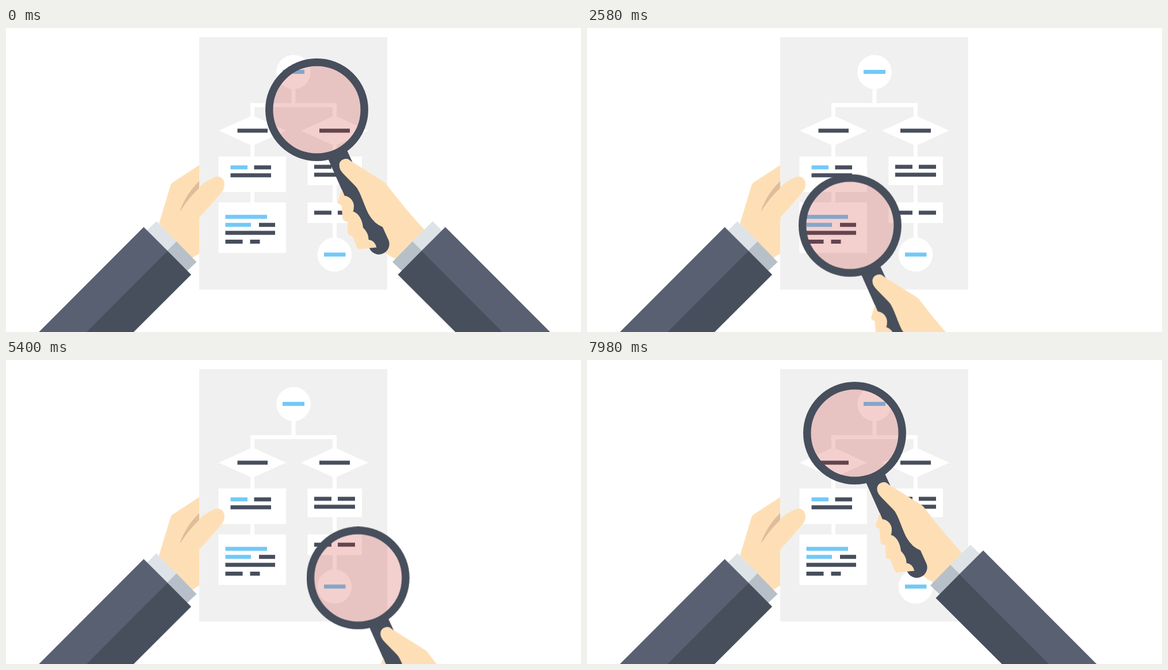
These frames come from a looping animation (1000 by 530 pixels, 8000 ms). An HTML page:

```html
<!DOCTYPE html>
<html lang="en">
<head>
<meta charset="utf-8">
<title>Inspecting a flowchart</title>
<style>
  html, body { margin: 0; width: 100%; height: 100%; overflow: hidden; background: #fff; }
  svg { display: block; width: 1000px; height: 530px; }
  .paper { fill: #f0f0f0; }
  .white { fill: #fff; }
  .dark { fill: #474e5c; }
  .blue { fill: #72c9f8; }
  .sleeve { fill: #586072; }
  .cuff { fill: #dde3e7; }
  .cuff-dark { fill: #b7c0c8; }
  .skin { fill: #fedfb5; }
  .crease { fill: #dfbd9c; }
  .glass { fill: rgba(200, 41, 32, .22); }
  .ring { fill: none; stroke: #474e5c; stroke-width: 13.5; }
</style>
</head>
<body>
<svg viewBox="0 0 1000 530">
  <defs>
    <g id="arm">
      <path class="cuff" d="M742 337L765 360L723 388L707 372Z"/>
      <path class="cuff-dark" d="M707 372L723 388L690 425L672 408Z"/>
      <path class="dark" d="M723 388L681.5 430L841.5 590H924Z"/>
      <path class="sleeve" d="M764 347L1006 590H923L722.5 388.5Z"/>
    </g>
  </defs>

  <path class="skin" d="M336 239L291 268.500Q287 271 286 275L266 341L322 402L336 393Z"/>
  <path class="crease" d="M336 267Q313 289 302.500 319L304 318Q318 296 336 279Z"/>
  <rect class="paper" x="336" y="16" width="327" height="440"/>
  <g id="chart"></g>
  <path class="skin" d="M335.500 278Q346 267 362 260.500C371 256 380 262 380 273Q380 280 375 286Q356 309 335.500 331Z"/>
  <use href="#arm" transform="matrix(-1 0 0 1 1003.500 0)"/>

  <g id="lens">
    <path class="skin" d="M579.500 239A11.500 11.500 0 0 1 599 231.500L657 268Q660 270 662 273Q697 319 728 352L679 402Q669 401 655 387L600 285Q580 255 579.500 239Z"/>
    <path class="dark" d="M560 228L592 211L602.500 234L599 231.500A11.500 11.500 0 0 0 579.500 239C579.500 246 583 250 588 255.500L608 276Q612 280 617 292C622 304 626 316 631 325Q640 341 655 347L664 367A17.500 17.500 0 0 1 633 386L588 291Z"/>
    <path class="skin" d="M584 281L588.500 292.500C598 293 605 302 605 310Q605 315 604 319.500L597 319C611 318 620 333 621 348Q631 358 630.500 369Q641 370 644.500 382.500L613.500 385.500Q611 385 610 382L602.500 363Q595 361 594.500 358L594 338Q586 336 585.500 333L583.500 309Q577 307 577 304Z"/>
    <use href="#arm"/>
    <circle class="glass" cx="540.5" cy="142.5" r="76.500"/>
    <circle class="ring" cx="540.5" cy="142.5" r="82.75"/>
  </g>
</svg>
<script>
  const chart = document.getElementById('chart');

  function add(tag, cls, attrs) {
    const el = document.createElementNS('http://www.w3.org/2000/svg', tag);
    el.setAttribute('class', cls);
    for (const key in attrs) el.setAttribute(key, attrs[key]);
    chart.append(el);
  }
  const box = (cls, x, y, x2, y2) =>
    add('rect', cls, { x, y, width: x2 - x, height: y2 - y });
  const bar = (cls, x, x2, y) => box(cls, x, y, x2, y + 7);
  const node = (cx, cy) => add('circle', 'white', { cx, cy, r: 29.8 });
  const link = (x, y, y2) => box('white', x - 3.5, y, x + 3.5, y2);
  const diamond = (x, y) =>
    add('path', 'white', { d: `M${x - 58.5} ${y}l58.500-26.500l58.500 26.500l-58.500 26.500z` });

  // Flowchart shapes
  const left = 428.5, right = 571.5;
  node(500, 76.7);
  link(500, 104, 132);
  box('white', 425, 131, 575, 138);
  for (const x of [left, right]) {
    link(x, 137, 156);
    diamond(x, 179);
    link(x, 202, 225);
  }
  box('white', 369.5, 224, 487, 286);
  link(left, 285, 305);
  box('white', 369.5, 304, 487, 392);
  box('white', 524.5, 224, 619, 274);
  link(right, 273, 305);
  box('white', 524.5, 304, 619, 340);
  link(right, 339, 368);
  node(right, 395);

  // Text bars: colour, left, right, top
  [
    ['blue', 481, 519, 73], ['blue', 553, 590.5, 391.5],
    ['dark', 402.5, 455, 175.5], ['dark', 545, 598, 175.5],
    ['blue', 390.5, 420, 239.5], ['dark', 431.5, 461, 239.5], ['dark', 390.5, 461, 253.3],
    ['blue', 381.5, 454, 325.7], ['blue', 381.5, 426, 339.7], ['dark', 440, 468, 339.7],
    ['dark', 381.5, 468, 353.6], ['dark', 381.5, 411.5, 369], ['dark', 424.5, 441.5, 369],
    ['dark', 536, 566, 238.5], ['dark', 577, 607, 238.5], ['dark', 536, 607, 252.3],
    ['dark', 536, 566, 318.5], ['dark', 577, 607, 318.5]
  ].forEach(b => bar(...b));

  // Straight moves between stops, one step per 30 ms: time, x, y
  const loop = 8000, tick = 30;
  const stops = [[0, 0, 0], [2700, -87, 211], [5430, 73.5, 237.7], [7980, -75, -15], [loop, -75, -15]];
  const frames = stops.map(([t, x, y], i) => {
    const next = stops[i + 1] || [t];
    const count = Math.max(1, Math.round((next[0] - t) / tick));
    return { offset: t / loop, transform: `translate(${x}px, ${y}px)`, easing: `steps(${count})` };
  });
  document.getElementById('lens').animate(frames, { duration: loop, iterations: Infinity });
</script>
</body>
</html>
```
